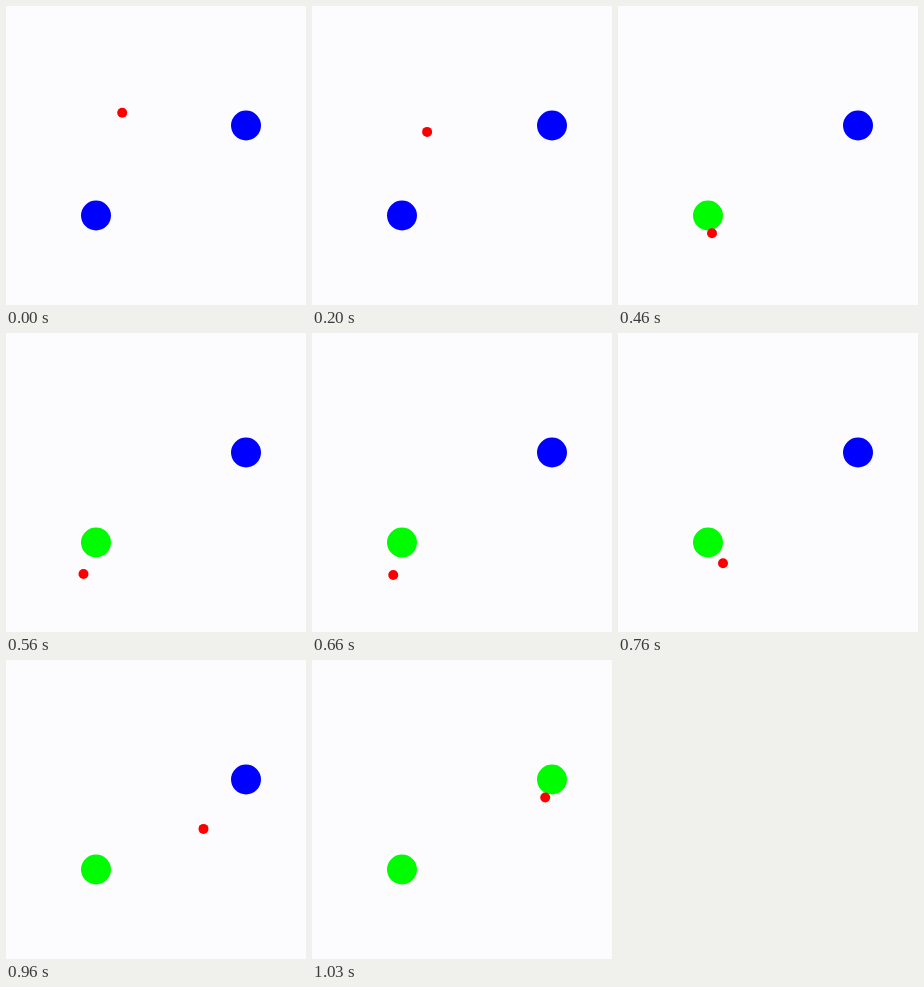
These frames come from a looping animation (300x299 px, 1.18 s). An HTML page:

```html
<!DOCTYPE html>
<html lang="en">
<head>
<meta charset="utf-8">
<title>Dot reaching two targets</title>
<style>
  html, body { margin: 0; width: 100%; height: 100%; overflow: hidden; background: #fcfcff; }
  svg { display: block; width: 100vw; height: 100vh; }
</style>
</head>
<body>
<svg viewBox="0 0 300 299">
  <circle class="target" cx="240" cy="119.5" r="15"/>
  <circle class="target" cx="90" cy="209.5" r="15"/>
  <circle id="dot" r="5" fill="#fc0000"/>
</svg>
<script>
const LOOP = 1180, HOLD = 200, STEPS = 26, REACH = 20;
const WAITING = "#0000ff", REACHED = "#00fc00";

// Waypoints of the dot: step, x, y
const knots = [
  [0, 116.2, 106.8], [5, 107.3, 188], [9, 94, 227.2], [12, 77.5, 241],
  [18, 105, 230.2], [21, 148.5, 205.7], [26, 233.2, 137.5]
];

const slope = (i, axis) =>
  (knots[i + 1][axis] - knots[i][axis]) / (knots[i + 1][0] - knots[i][0]);

// Velocity at a knot, from the parabola through it and its neighbours
function tangent(i, axis) {
  const last = knots.length - 1;
  if (i === 0) return 2 * slope(0, axis) - tangent(1, axis);
  if (i === last) return 2 * slope(last - 1, axis) - tangent(last - 1, axis);
  const before = knots[i][0] - knots[i - 1][0];
  const after = knots[i + 1][0] - knots[i][0];
  return (after * slope(i - 1, axis) + before * slope(i, axis)) / (before + after);
}

// Cubic Hermite position at a step
function position(step, axis) {
  let i = 0;
  while (i < knots.length - 2 && step >= knots[i + 1][0]) i++;
  const h = knots[i + 1][0] - knots[i][0];
  const u = (step - knots[i][0]) / h;
  const v = 1 - u;
  return v * v * (1 + 2 * u) * knots[i][axis] + u * v * v * h * tangent(i, axis)
    + u * u * (3 - 2 * u) * knots[i + 1][axis] - u * u * v * h * tangent(i + 1, axis);
}

const path = Array.from({ length: STEPS + 1 }, (_, s) => [position(s, 1), position(s, 2)]);
const dot = document.getElementById("dot");
const targets = [...document.querySelectorAll(".target")].map(el => {
  const cx = +el.getAttribute("cx"), cy = +el.getAttribute("cy");
  return { el, hit: path.findIndex(([x, y]) => Math.hypot(x - cx, y - cy) < REACH) };
});

// 30 steps per second, with step times cut to 10 ms
function stepAt(t) {
  const ticks = Math.floor((t - HOLD) / 10) + 1;
  return Math.min(STEPS, Math.max(0, Math.ceil(3 * ticks / 10)));
}

function draw(now) {
  const step = stepAt(now % LOOP);
  dot.setAttribute("cx", path[step][0]);
  dot.setAttribute("cy", path[step][1]);
  for (const { el, hit } of targets) el.setAttribute("fill", step >= hit ? REACHED : WAITING);
}

const start = performance.now();
function tick() {
  draw(performance.now() - start);
  requestAnimationFrame(tick);
}
tick();
</script>
</body>
</html>
```
